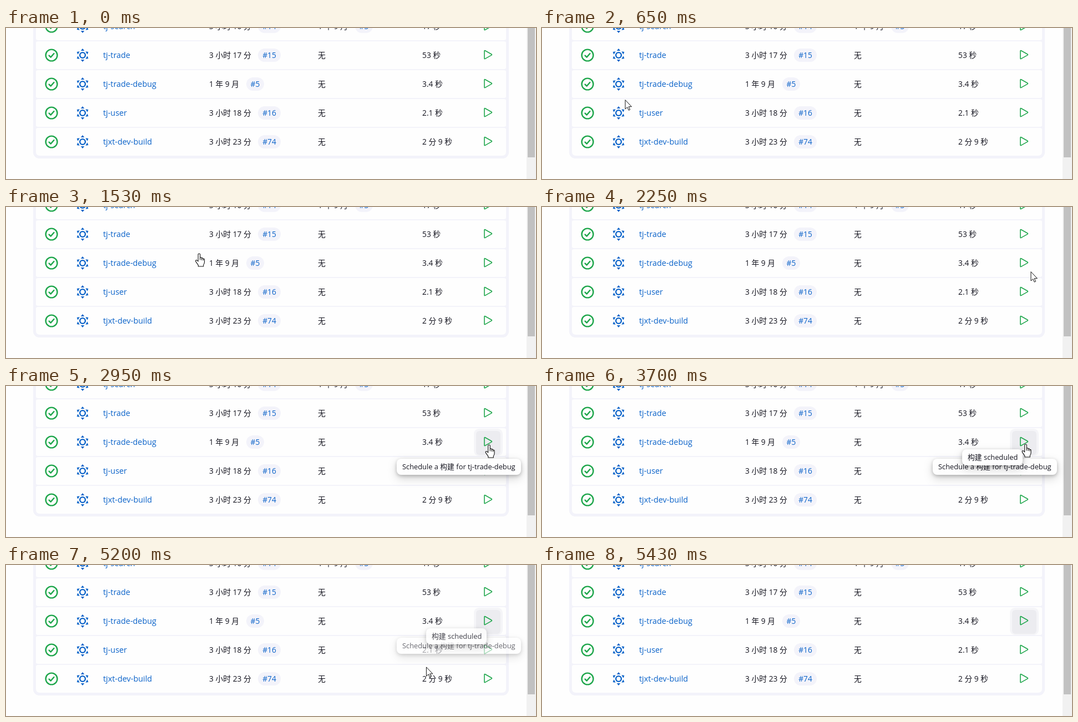
An HTML page that plays this animation: 955x272 px, repeating every 6180 ms.

```html
<!DOCTYPE html>
<html lang="zh-CN">
<head>
<meta charset="utf-8">
<style>
html, body { margin: 0; width: 100%; height: 100%; overflow: hidden; background: #fefefe; }
svg { display: block; }
text { font: 13.8px "Open Sans", "Noto Sans CJK SC", "Noto Sans CJK", sans-serif; fill: #14141f; }
.link { font-size: 14.4px; fill: #0b63c9; }
.num { font-size: 13.8px; fill: #0b63c9; }
.bold { font-weight: 700; }
.tip text { font-size: 12.85px; }
.popup, .tip { filter: drop-shadow(0 2px 3px rgba(0,0,0,.22)) drop-shadow(0 6px 8px rgba(0,0,0,.17)); }
</style>
</head>
<body>
<svg width="955" height="272" viewBox="0 0 955 272">
  <defs>
    <g id="ok" fill="none" stroke="#1ea64b" stroke-width="2.4" stroke-linecap="round" stroke-linejoin="round">
      <circle r="10.4"/><path d="M-4.4 .6L-1.4 3.6L4.4 -3"/>
    </g>
    <g id="sun" fill="#0b63c9">
      <circle r="4.9" fill="none" stroke="#0b63c9" stroke-width="2.4"/>
    </g>
    <path id="play" d="M-6.3 -7.2Q-6.3 -8.6 -5 -7.9L6.6 -1.4Q7.8 -.6 6.6 .2L-5 6.7Q-6.3 7.4 -6.3 6Z"
      fill="none" stroke="#1ea64b" stroke-width="1.6" stroke-linejoin="round"/>
  </defs>
  <rect x="49" y="-40" width="857" height="275" rx="11" fill="#f3f3fa"/>
  <g id="rows"></g>
  <rect x="938" width="17" height="272" fill="#f1f1f1"/>
  <rect x="940" width="13" height="233" fill="#c1c1c1"/>

  <g id="popup" class="popup">
    <rect x="130" y="112" width="460" height="102" rx="8" fill="#f3f3f9"/>
    <rect x="135" y="159" width="450" height="50" rx="5" fill="#fefefe"/>
    <text class="bold" x="152.5" y="141">W</text>
    <text class="bold" x="205" y="141">描述</text>
    <text class="bold" x="577" y="141" text-anchor="end">%</text>
    <use href="#sun" x="165" y="184"/>
    <text x="205" y="188">构建稳定性: 最近没有失败的构建。</text>
    <text x="577" y="188" text-anchor="end">100</text>
  </g>
  <g id="hint" class="tip">
    <rect x="704" y="131" width="224" height="29" rx="8" fill="#fefefe"/>
    <text x="714" y="150">Schedule a 构建 for tj-trade-debug</text>
  </g>
  <g id="notice" class="tip">
    <rect x="757" y="114" width="109" height="29" rx="8" fill="#fefefe"/>
    <text x="767" y="133">构建 scheduled</text>
  </g>

  <g id="cursor" stroke-linejoin="round" stroke-linecap="round">
    <path id="arrow" d="M0 0V16L3.8 12.6L6.2 18.2L8.6 17.1L6.2 11.7H11Z" fill="#fff" stroke="#111"/>
    <path id="hand" d="M-1.8 1.6Q-1.8 0 0 0Q1.8 0 1.8 1.6V7Q4.4 6.4 4.7 8Q7 7.5 7.4 9.2Q9.6 9 9.6 11V15Q9.6 18 7.8 20V23H-1.6V20.6L-6 14.4Q-7 12.4 -5.4 11.7Q-4 11.2 -1.8 14ZM1.8 7V11M4.7 8V11.4M7.4 9.2V12"
      fill="#fff" stroke="#111" stroke-width="1.1"/>
    <path id="beam" d="M-3 -6.5H-1L0 -6L1 -6.5H3M0 -6V6M-3 6.5H-1L0 6L1 6.5H3" fill="none" stroke="#111"/>
  </g>
</svg>
<script>
const $ = id => document.getElementById(id);
const LOOP = 6180;

for (let a = 30; a < 390; a += 60)
  $('sun').innerHTML += `<path d="M12 0L8 -3.2V3.2Z" transform="rotate(${a})"/>`;

const text = (x, y, s, cls = '') => `<text x="${x}" y="${y}" class="${cls}">${s}</text>`;
const pill = (x, y, s) => {
  const w = s.length > 2 ? 41 : 32;
  return `<rect x="${x}" y="${y - 12}" width="${w}" height="24" rx="12" fill="#f3f3fa"/>` +
    `<text x="${x + w / 2}" y="${y + 5}" class="num" text-anchor="middle">${s}</text>`;
};

// name, last success, its build, last failure, its build, duration
const jobs = [
  ['tj-search', '3 小时 16 分', '#14', '1 年 9 月', '#3', '17 秒'],
  ['tj-trade', '3 小时 17 分', '#15', '无', '', '53 秒'],
  ['tj-trade-debug', '1 年 9 月', '#5', '无', '', '3.4 秒'],
  ['tj-user', '3 小时 18 分', '#16', '无', '', '2.1 秒'],
  ['tjxt-dev-build', '3 小时 23 分', '#74', '无', '', '2 分 9 秒'],
];
$('rows').innerHTML = jobs.map(([name, good, build, bad, badBuild, time], i) => {
  const y = 52 * i - 3, base = y + 5;
  const last = i === jobs.length - 1;
  const box = last
    ? `<path d="M57 ${y - 25}H898Q901 ${y - 25} 901 ${y - 22}V${y + 18}Q901 ${y + 25} 894 ${y + 25}H61Q54 ${y + 25} 54 ${y + 18}V${y - 22}Q54 ${y - 25} 57 ${y - 25}Z" fill="#fefefe"/>`
    : `<rect x="54" y="${y - 25}" width="847" height="50" rx="3" fill="#fefefe"/>`;
  const hover = i === 2
    ? `<g id="hover"><rect x="843" y="77" width="52" height="49" rx="9" fill="#f5f5f8"/>
       <rect x="847" y="81" width="44" height="43" rx="6" fill="#ececf0"/></g>` : '';
  return box + hover +
    `<use href="#ok" x="82" y="${y}"/><use href="#sun" x="138" y="${y}"/><use href="#play" x="868.3" y="${y - .3}"/>` +
    text(175, base, name, 'link') + text(366, base, good) + pill(build.length > 2 ? 454 : 433, y, build) +
    text(562, base, bad) + (badBuild && pill(629, y, badBuild)) + text(750, base, time);
}).join('');

// pointer path: time, x, y, shape
const path = [
  [370, 262, 262, 'arrow'], [620, 150, 130, 'arrow'], [720, 140, 110, 'hand'],
  [870, 152, 128, 'arrow'], [1020, 205, 195, 'beam'], [1120, 225, 193, 'beam'],
  [1220, 250, 185, 'beam'], [1320, 290, 150, 'arrow'], [1420, 322, 105, 'arrow'],
  [1520, 348, 84, 'hand'], [1570, 500, 62, 'arrow'], [1620, 722, 59, 'arrow'],
  [1670, 750, 72, 'arrow'], [1920, 850, 134, 'arrow'], [2220, 881, 117, 'arrow'],
  [2460, 881, 117, 'arrow'], [2470, 881, 116, 'arrow'], [2620, 880, 115, 'arrow'],
  [2720, 870.5, 106, 'hand'], [3310, 870.5, 106, 'hand'], [3320, 871.5, 105, 'hand'],
  [4860, 871.5, 105, 'hand'], [4870, 871.5, 107, 'hand'], [4970, 866, 117, 'hand'],
  [5070, 830, 150, 'arrow'], [5420, 576, 270, 'arrow'],
];

const ramp = (t, a, b) => Math.min(1, Math.max(0, (t - a) / (b - a)));
const fade = (t, a, b, c, d) => ramp(t, a, b) * (1 - ramp(t, c, d));

function draw(now) {
  const t = now % LOOP;
  const step = Math.floor((t - 20) / 50) * 50 + 20;
  $('popup').style.opacity = fade(step, 740, 920, 1380, 1500);
  $('hint').style.opacity = fade(step, 2750, 2920, 5050, 5370);
  $('notice').style.opacity = fade(step, 3460, 3670, 5100, 5420);
  $('hover').style.opacity = ramp(step, 2660, 2770);

  const i = path.findIndex((p, k) => k && step < p[0]);
  const shown = step >= 370 && i > 0;
  $('cursor').style.display = shown ? '' : 'none';
  if (shown) {
    const [t0, x0, y0, shape] = path[i - 1], [t1, x1, y1] = path[i];
    const k = ramp(step, t0, t1);
    $('cursor').setAttribute('transform', `translate(${x0 + (x1 - x0) * k} ${y0 + (y1 - y0) * k})`);
    for (const id of ['arrow', 'hand', 'beam']) $(id).style.display = id === shape ? '' : 'none';
  }
  requestAnimationFrame(tick);
}
const start = performance.now();
function tick() { draw(performance.now() - start); }
tick();
</script>
</body>
</html>
```
